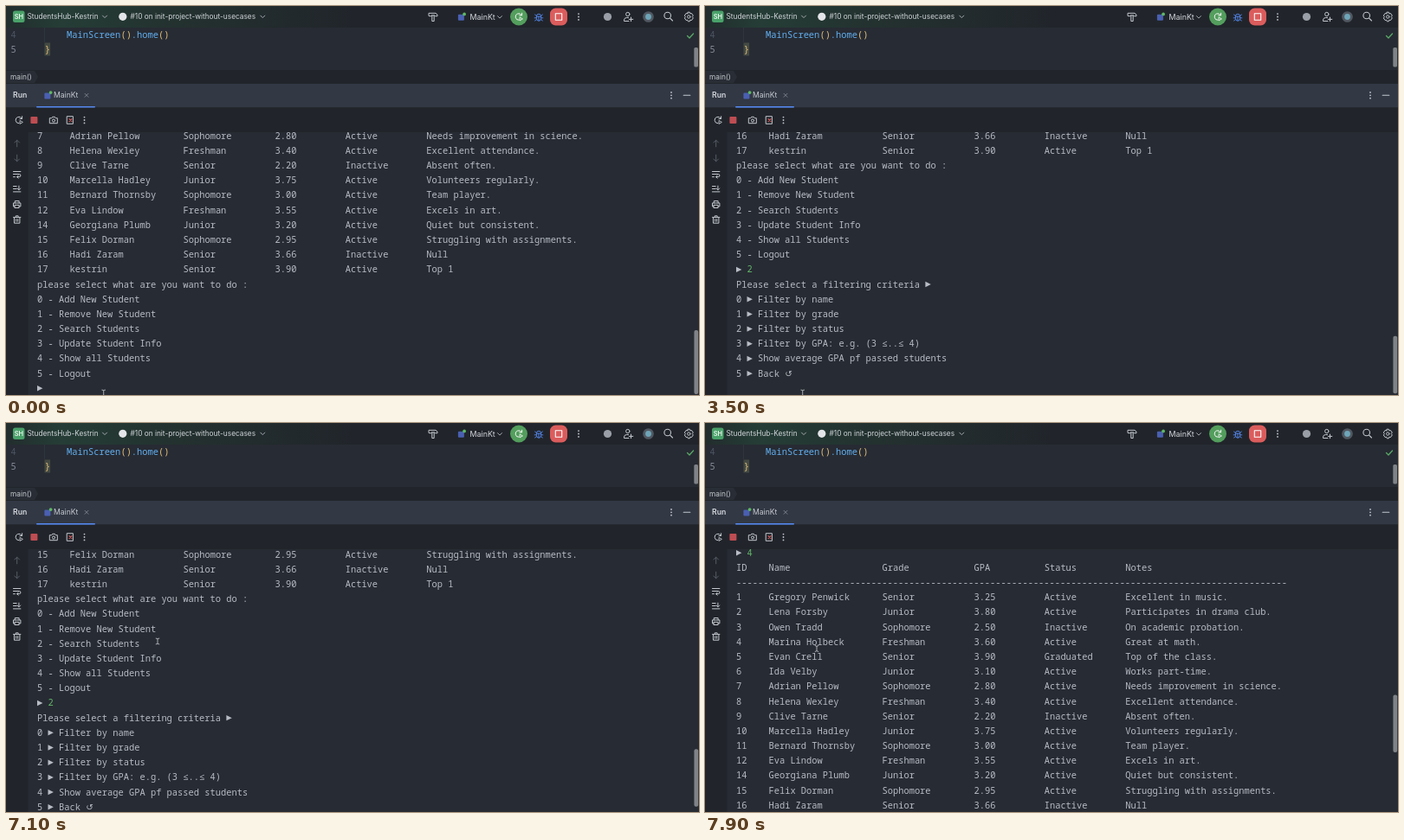
These frames come from a looping animation (800x450 px, 8 s). An HTML page with a canvas:

```html
<!DOCTYPE html>
<html lang="en">
<head>
<meta charset="utf-8">
<title>Console session</title>
<style>
html, body { margin: 0; width: 100%; height: 100%; overflow: hidden; background: #21252b; }
canvas { display: block; width: 800px; height: 450px; }
</style>
</head>
<body>
<canvas id="stage"></canvas>
<script>
const W = 800, H = 450, LOOP = 8000, STEP = 100;
const CHAR = 6.24, LINE = 17.18, LEFT = 36;
const MONO = '10.4px "Noto Sans Mono", "DejaVu Sans Mono", monospace';
const UI = 'Inter, Roboto, sans-serif';
const COL = [0, 6, 27, 44, 57, 72];
const PANEL = '#21252b', BACK = '#272b33', STRIP = '#323844', TEXT = '#b7bcc5';
const ICON = '#c3c7ce', DIM = '#555b66', THUMB = '#808388';
const GREEN = '#62b76a', RED = '#db5c5c', BLUE = '#568af2', GOLD = '#e5c07b';

const canvas = document.getElementById('stage');
const ctx = canvas.getContext('2d');
const dpr = window.devicePixelRatio || 1;
canvas.width = W * dpr;
canvas.height = H * dpr;

const students = [
  '1|Gregory Penwick|Senior|3.25|Active|Excellent in music.',
  '2|Lena Forsby|Junior|3.80|Active|Participates in drama club.',
  '3|Owen Tradd|Sophomore|2.50|Inactive|On academic probation.',
  '4|Marina Holbeck|Freshman|3.60|Active|Great at math.',
  '5|Evan Crell|Senior|3.90|Graduated|Top of the class.',
  '6|Ida Velby|Junior|3.10|Active|Works part-time.',
  '7|Adrian Pellow|Sophomore|2.80|Active|Needs improvement in science.',
  '8|Helena Wexley|Freshman|3.40|Active|Excellent attendance.',
  '9|Clive Tarne|Senior|2.20|Inactive|Absent often.',
  '10|Marcella Hadley|Junior|3.75|Active|Volunteers regularly.',
  '11|Bernard Thornsby|Sophomore|3.00|Active|Team player.',
  '12|Eva Lindow|Freshman|3.55|Active|Excels in art.',
  '14|Georgiana Plumb|Junior|3.20|Active|Quiet but consistent.',
  '15|Felix Dorman|Sophomore|2.95|Active|Struggling with assignments.',
  '16|Hadi Zaram|Senior|3.66|Inactive|Null',
  '17|kestrin|Senior|3.90|Active|Top 1'
];
const menu = ['Add New Student', 'Remove New Student', 'Search Students',
  'Update Student Info', 'Show all Students', 'Logout'];
const filters = ['Filter by name', 'Filter by grade', 'Filter by status',
  'Filter by GPA: e.g. (3 ≤..≤ 4)', 'Show average GPA pf passed students', 'Back ↺'];

const lines = [
  '▶',
  'ID|Name|Grade|GPA|Status|Notes',
  '-'.repeat(102),
  ...students,
  'please select what are you want to do :',
  ...menu.map((s, i) => `${i} - ${s}`),
  '▶',
  'Please select a filtering criteria ▶',
  ...filters.map((s, i) => `${i} ▶ ${s}`)
];
const PROMPT = 26, TYPED = 1100, ENTER = 1300, GLIDE = 292;

// Keyframes: time, then values
const scrollKeys = [[0, -4.6], [7000, -142], [7100, -122.9], [7300, -38], [7600, 98.3], [7900, 150]];
const mouseKeys = [[0, 112.7, 447.5], [6300, 112.7, 447.5], [7100, 175, 252.5], [7600, 212, 292], [7900, 129, 261]];

const smooth = p => { p = Math.max(0, Math.min(1, p)); return p * p * (3 - 2 * p); };

function along(keys, t, n) {
  let i = 0;
  while (i < keys.length - 2 && t > keys[i + 1][0]) i++;
  const a = keys[i], b = keys[i + 1];
  const p = Math.max(0, Math.min(1, (t - a[0]) / (b[0] - a[0])));
  return a[n] + (b[n] - a[n]) * p;
}

function scrollAt(t) {
  if (t <= 7000) return -4.6 - 137.4 * smooth((t - ENTER) / GLIDE);
  return along(scrollKeys, t, 1);
}

function rect(x, y, w, h, color, r = 0) {
  ctx.fillStyle = color;
  ctx.beginPath();
  ctx.roundRect(x, y, w, h, r);
  ctx.fill();
}

function disc(x, y, r, color) {
  ctx.fillStyle = color;
  ctx.beginPath();
  ctx.arc(x, y, r, 0, 7);
  ctx.fill();
}

function icon(x, y, path, color = ICON, width = 1) {
  ctx.save();
  ctx.translate(x, y);
  ctx.strokeStyle = color;
  ctx.lineWidth = width;
  ctx.lineCap = ctx.lineJoin = 'round';
  ctx.stroke(new Path2D(path));
  ctx.restore();
}

function label(s, x, y, color, font) {
  ctx.font = font;
  ctx.fillStyle = color;
  ctx.fillText(s, x, y);
}

const ui = (s, x, y, size, color = TEXT, weight = 400) =>
  label(s, x, y + size * 0.36, color, `${weight} ${size}px ${UI}`);

const ring = r => `M${r} 0A${r} ${r} 0 1 1 ${-r} 0A${r} ${r} 0 1 1 ${r} 0`;
const chevron = (x, y) => icon(x, y, 'M-2.5 -1.2L0 1.3L2.5 -1.2', '#a4a9b1');
const dots = (x, y) => [-3.4, 0, 3.4].forEach(d => disc(x, y + d, 0.9, ICON));

function rerun(x, y, color) {
  icon(x, y, 'M3.3 -1.8A3.8 3.8 0 1 0 0 3.8M3.6 -4.3V-1.6H.9', color);
  icon(x, y, 'M1.4 .6L4.4 2.4L1.4 4.2Z', color, 0.9);
}

function fileIcon(x, y) {
  rect(x - 3.6, y - 3.3, 7, 7, '#4a5fb0', 1);
  disc(x + 3.6, y - 3.6, 1.9, '#5fb865');
}

function drawMono(s, x, y, color) {
  label(s.replace(/[▶↺]/g, ' '), x, y + 3.7, color, MONO);
  [...s].forEach((c, i) => {
    const cx = x + i * CHAR;
    if (c === '▶') {
      ctx.beginPath();
      ctx.moveTo(cx, y - 3);
      ctx.lineTo(cx + 6.4, y + 0.2);
      ctx.lineTo(cx, y + 3.4);
      ctx.fill();
    } else if (c === '↺') {
      label(c, cx, y + 3.6, color, '10px "DejaVu Sans", sans-serif');
    }
  });
}

function drawHeader() {
  rect(0, 0, W, 25, PANEL);
  const g = ctx.createLinearGradient(0, 0, 400, 0);
  g.addColorStop(0, '#222d2d');
  g.addColorStop(0.16, '#253d36');
  g.addColorStop(0.5, '#23312f');
  g.addColorStop(1, PANEL);
  rect(0, 0, 400, 25, g);

  rect(8, 5.5, 13.5, 13.5, '#4aa26a', 2.5);
  ui('SH', 9.7, 12.3, 7.4, '#eef5f0', 600);
  ui('StudentsHub-Kestrin', 24.5, 12.3, 8.3, '#d0d4d8');
  chevron(114, 12.3);
  disc(134.8, 12.3, 4.6, '#e3e5e8');
  ui('#10 on init-project-without-usecases', 143.5, 12.3, 8.3, '#d0d4d8');
  chevron(296.3, 12.3);

  icon(493, 12.5, 'M-5 -1.5V-4.2H3L5 -2.4V-.8H2.6L1.5 -1.6H-1.6L-2.6 -.8ZM-1.2 -1.4V5H1.2V-1.4');
  fileIcon(525.5, 13);
  ui('MainKt', 535.5, 12.8, 8.9, '#d5d8dd');
  chevron(570, 12.8);
  disc(592, 12.5, 10, '#539e5d');
  rerun(592, 12.5, '#f2f5f2');
  icon(615, 13, 'M-2.6 -1.2A2.6 2.6 0 0 1 2.6 -1.2V1.6A2.6 2.6 0 0 1 -2.6 1.6ZM-2.6 -.8H2.6M0 -.8V4M-2.6 .8H-4.8M2.6 .8H4.8M-2.5 2.6L-4.4 4M2.5 2.6L4.4 4M-2.5 -1.4L-4.4 -3M2.5 -1.4L4.4 -3', BLUE, 0.9);
  rect(628, 2.5, 20, 20, RED, 6.5);
  icon(638, 12.5, 'M-3.7 -3.7H3.7V3.7H-3.7Z', '#fff', 1.1);
  dots(661, 12.5);
  disc(694.5, 12.5, 4.6, '#9a9fa7');
  icon(718, 12.5, 'M2 -3A2.2 2.2 0 1 1 -2.4 -3A2.2 2.2 0 1 1 2 -3M1 5H-4.5V3.6A3 3 0 0 1 -1.5 1H.5M3.5 .6V5.2M1.2 2.9H5.8');
  disc(741.5, 12.5, 6.3, '#515861');
  disc(741.5, 12.5, 3.4, '#6fa5b8');
  icon(764.5, 12, 'M3 -1A3.8 3.8 0 1 1 -4.6 -1A3.8 3.8 0 1 1 3 -1M1.9 1.8L5 5', ICON, 1.1);
  icon(788.3, 12.5, 'M-1 -5.3H1L1.5 -3.7L3.2 -4L5 -1.4L3.9 0L5 1.4L3.2 4L1.5 3.7L1 5.3H-1L-1.5 3.7L-3.2 4L-5 1.4L-3.9 0L-5 -1.4L-3.2 -4L-1.5 -3.7Z');
  icon(788.3, 12.5, ring(1.7));
}

function drawEditor() {
  rect(0, 25, W, 49, BACK);
  rect(44, 25, 0.7, 17, '#343a43');
  drawMono('4', 5.5, 33, '#4d5565');
  drawMono('5', 5.5, 50, '#858c98');
  drawMono('MainScreen  .home', 70, 33, '#61afef');
  drawMono('()', 70 + 10 * CHAR, 33, GOLD);
  drawMono('()', 70 + 17 * CHAR, 33, GOLD);
  rect(44.5, 42.5, 6.6, 15, '#444a43');
  drawMono('}', 44.7, 50, GOLD);
  icon(790, 34.5, 'M-3.5 0L-1 2.5L3.5 -2.5', '#59a869', 1.3);
  rect(794.3, 48, 4.7, 22.5, THUMB, 1.5);

  rect(0, 74, W, 16, PANEL);
  ctx.fillStyle = '#292e36';
  ctx.fill(new Path2D('M0 75H33L37 82L33 89H0Z'));
  ui('main()', 5, 82, 8.3, '#c3c7cd');
}

function drawPanel() {
  rect(0, 90, W, 27.5, STRIP);
  rect(0, 117.5, W, 28.5, PANEL);
  ui('Run', 8, 103.3, 8.7, '#d5d8dd', 600);
  fileIcon(48, 103.7);
  ui('MainKt', 55, 103.3, 8.6, '#c5c9d0');
  icon(93, 103.3, 'M-2 -2L2 2M2 -2L-2 2', '#80868f', 0.9);
  rect(35, 116, 68, 1.6, BLUE, 0.8);
  dots(768, 103.3);
  icon(786, 103.3, 'M-3.8 0H3.8', ICON, 1.1);

  rerun(15, 132, ICON);
  rect(28.4, 128, 8, 8, '#bd4d52', 1);
  icon(55, 132, 'M-4.3 -2.3H-2.2L-1.4 -3.7H1.4L2.2 -2.3H4.3V3.7H-4.3Z');
  icon(55, 132.5, ring(1.6));
  icon(74, 132, 'M-3.4 -4.3H3.4V4.3H-3.4Z');
  icon(74.5, 132.2, 'M-1.5 -1.5L1.5 1.5M1.5 -1.5L-1.5 1.5', RED, 1.2);
  dots(90.5, 132);
}

function drawSide() {
  rect(0, 146, 25.5, H - 146, PANEL);
  icon(12.7, 159, 'M0 3.8V-3.8M-2.8 -1L0 -3.8L2.8 -1', DIM);
  icon(12.7, 176, 'M0 -3.8V3.8M-2.8 1L0 3.8L2.8 1', DIM);
  icon(12.7, 194.5, 'M-4.2 -3H4.2M-4.2 0H2.6A1.6 1.6 0 0 1 2.6 3.2H0M1.5 1.7L0 3.2L1.5 4.7M-4.2 3.2H-2.3');
  icon(12.7, 211.5, 'M-4.2 -3H-.5M-4.2 0H-.5M-4.2 3.4H4.2M2.2 -3.4V1.2M.4 -.5L2.2 1.3L4 -.5');
  icon(12.7, 229.5, 'M-2.4 -1.6V-4H2.4V-1.6M-2.4 2.4H-4.2V-1.6H4.2V2.4H2.4M-2.4 .8H2.4V4H-2.4Z');
  icon(12.7, 247, 'M-4.2 -2.6H4.2M-1.4 -2.8V-4.2H1.4V-2.8M-3.2 -2.4V4.2H3.2V-2.4M-1 -.4V2.2M1 -.4V2.2');
}

function drawConsole(t) {
  const top = scrollAt(t);
  ctx.save();
  ctx.beginPath();
  ctx.rect(25.5, 146, W - 25.5, H - 146);
  ctx.clip();
  rect(25, 146, W - 25, H - 146, BACK);

  lines.forEach((line, i) => {
    const y = top + i * LINE;
    if (y < 135 || y > 460 || (i > PROMPT && t < ENTER)) return;
    line.split('|').forEach((s, n) => drawMono(s, LEFT + COL[n] * CHAR, y, TEXT));
    if (i === 0) drawMono('4', LEFT + 2 * CHAR, y, GREEN);
    if (i === PROMPT && t >= TYPED) drawMono('2', LEFT + 2 * CHAR, y, GREEN);
  });

  const grown = t >= ENTER;
  const thumb = grown ? 381.7 - 0.23 * (top + 142) : 375;
  rect(794.4, thumb, 4.8, grown ? 66.5 : 74, THUMB, 2);
  ctx.restore();
}

function drawMouse(t) {
  const x = along(mouseKeys, t, 1), y = along(mouseKeys, t, 2);
  icon(x, y, 'M-1.8 -3.4Q0 -3.4 0 -2.4Q0 -3.4 1.8 -3.4M0 -2.6V2.6M-1.8 3.4Q0 3.4 0 2.4Q0 3.4 1.8 3.4', '#b9bcc1', 0.9);
}

let origin = null;

function frame(now) {
  if (origin === null) origin = now;
  const t = Math.floor(((now - origin) % LOOP) / STEP) * STEP;
  ctx.setTransform(dpr, 0, 0, dpr, 0, 0);
  drawHeader();
  drawEditor();
  drawPanel();
  drawSide();
  drawConsole(t);
  drawMouse(t);
  requestAnimationFrame(frame);
}
requestAnimationFrame(frame);
</script>
</body>
</html>
```
